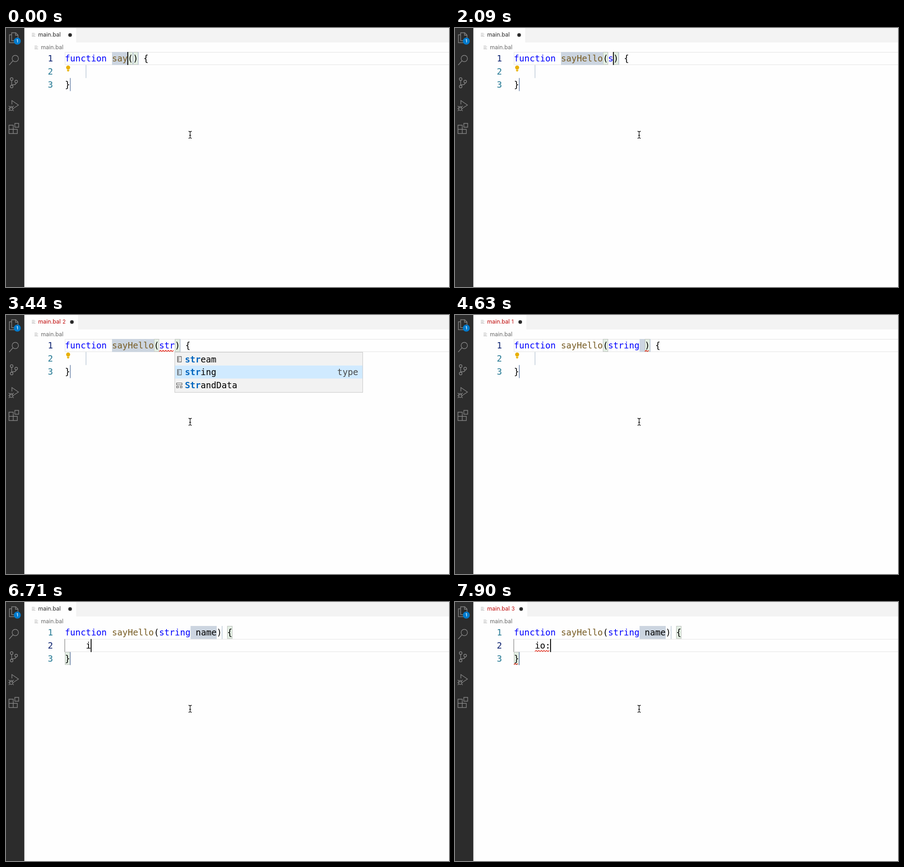
Write an HTML page that moves like this. It is 978 px wide and 573 px high and loops after 8 s.

```html
<!DOCTYPE html>
<html lang="en">
<head>
<meta charset="utf-8">
<title>Editor typing</title>
<style>
  html, body { margin: 0; width: 100%; height: 100%; overflow: hidden; background: #fefefe; }
  svg { display: block; position: absolute; left: 0; top: 0; }
  text { white-space: pre; }
  .code { font: 19.2px "DejaVu Sans Mono", monospace; fill: #000; }
  .ui { font: 12.5px Inter, sans-serif; }
  .kw { fill: #00f; }
  .fn { fill: #795e26; }
  .match { fill: #0066bf; font-weight: bold; }
  .icon { fill: none; stroke: #858585; stroke-width: 1.4; }
  .thin { fill: none; stroke: #505050; stroke-width: 1.1; }
  .lines { stroke: #c3c3c3; stroke-width: 1.1; fill: none; }
  .squiggle { fill: none; stroke: #e51400; stroke-width: 1.2; }
  .bracket { fill: #e4f0e4; stroke: #b9bdb9; }
</style>
</head>
<body>
<svg width="978" height="573" viewBox="0 0 978 573">
  <rect width="978" height="32" fill="#f3f3f3"/>
  <g id="tab"></g>
  <path class="lines" d="M57 11.5h6M57 13.8h8M57 16.1h6M57 18.4h8"/>
  <path class="lines" d="M63 39.5h6M63 41.8h8M63 44.1h6M63 46.4h8"/>
  <text class="ui" x="77" y="47" fill="#6c6c6c">main.bal</text>

  <g id="editor"></g>

  <rect width="40.5" height="573" fill="#2c2c2c"/>
  <g class="icon">
    <path d="M12.5 10.5h9l5 5v12.5h-14zM21 10.5v5.5h5.500M12.500 15h-5v17.500h13v-4"/>
    <circle cx="20.500" cy="67.500" r="7"/>
    <path d="M15.500 72.500L7 82"/>
    <circle cx="12.500" cy="113" r="3"/>
    <circle cx="22.500" cy="118.500" r="3"/>
    <circle cx="12.500" cy="129.500" r="3"/>
    <path d="M12.500 116v10.500M22.500 121.500q-1 4-5 4h-2q-3 0-3 2"/>
    <path d="M13 169V160.500L27.500 170.500L17.500 177"/>
    <ellipse cx="11.500" cy="178" rx="3.500" ry="4.500"/>
    <path d="M8 176.500h7M6 172.500l3 2.500M17 172.500l-3 2.500M5.500 178.500h2.500M15 178.500h2.500M6 183.500l3-2.500M17 183.500l-3-2.500"/>
    <path d="M6.500 215h9.500v18.500h-9.500zM6.500 224.200h18.500v9.300h-9M19.500 211h8.500v8.500h-8.500z"/>
  </g>
  <circle cx="25" cy="29" r="7.700" fill="#007acc"/>
  <text x="25" y="32.300" text-anchor="middle" fill="#fff" style="font:600 9px Inter, sans-serif">1</text>

  <path d="M403 228.500q3.500 0 3.500 2.500v10.500q0 2.500-3.500 2.500M410 228.500q-3.500 0-3.500 2.500M410 244q-3.500 0-3.500-2.500M404.500 237.500h4"
    fill="none" stroke="#111" stroke-width="1.300"/>
</svg>
<script>
const LOOP = 8000, CHAR = 11.56, LEFT = 130, TOP = 53, ROW = 28.85;
const colX = col => LEFT + col * CHAR;
const rowY = row => TOP + row * ROW;

const initial = {
  name: 'say', args: '', body: '', errors: 0, row: 0, caret: 12, caretOn: true,
  bulb: true, mark: [9, 12], wavy: [], popup: null
};
const popup = (col, row, match, items, selected, kind = 'type') =>
  ({ col, row, match, items, selected, kind });
const stTypes = ['stream', 'string', 'StrandData'];
const ioItems = ['io', 'ioError'];

// Each step overrides part of the preceding state.
const steps = [
  [0, {}],
  [300, { name: 'sayH', caret: 13, mark: [9, 13] }],
  [450, { name: 'sayHe', caret: 14 }],
  [600, { mark: [9, 14] }],
  [900, { name: 'sayHell', caret: 16, mark: [9, 16] }],
  [1050, { name: 'sayHello', caret: 17, mark: [9, 17] }],
  [1500, { caret: 18 }],
  [2090, { args: 's', caret: 19 }],
  [2240, { errors: 2, wavy: [[0, 18, 19]], popup: popup(19, 0, 1, [...stTypes, 'service', 'start'], 0) }],
  [2390, { args: 'st', caret: 20, popup: popup(20, 0, 2, stTypes, 0) }],
  [2540, { args: 'str', caret: 21, popup: popup(21, 0, 3, stTypes, 0) }],
  [2690, { wavy: [[0, 18, 21]] }],
  [2990, { caretOn: false }],
  [3440, { popup: popup(21, 0, 3, stTypes, 1) }],
  [3590, { args: 'string', caret: 24, caretOn: true, popup: null, wavy: [[0, 18, 24]] }],
  [3730, { mark: null }],
  [4030, { args: 'string ', caret: 25, mark: [24, 25], wavy: [] }],
  [4180, { errors: 1 }],
  [4330, { wavy: [[0, 25, 26]] }],
  [4630, { caretOn: false }],
  [4780, { args: 'string n', caret: 26, caretOn: true, mark: [24, 26], wavy: [[0, 26, 27]] }],
  [4930, { args: 'string na', caret: 27, mark: [24, 27], wavy: [] }],
  [5080, { args: 'string nam', caret: 28, mark: [24, 28], errors: 0 }],
  [5220, { args: 'string name', caret: 29, mark: [24, 29] }],
  [5670, { caretOn: false }],
  [5970, { row: 1, caret: 4, caretOn: true }],
  [6270, { bulb: false }],
  [6420, { caretOn: false }],
  [6710, { body: 'i', caret: 5, caretOn: true }],
  [6860, { popup: popup(5, 1, 1, ['int', 'if', 'import', 'io', 'is'], 0) }],
  [7010, { body: 'io', caret: 6, errors: 3, wavy: [[1, 4, 5], [2, 0, 1]], popup: popup(6, 1, 2, ioItems, 0, 'module') }],
  [7300, { caretOn: false }],
  [7450, { wavy: [[1, 4, 6], [2, 0, 1]] }],
  [7750, { body: 'io:', caret: 7, caretOn: true }],
  [7900, { popup: null, wavy: [[1, 4, 7], [2, 0, 1]] }]
];
let latest = initial;
const timeline = steps.map(([at, change]) => ({ at, state: latest = { ...latest, ...change } }));

const rect = (x, y, w, h, attrs) => `<rect x="${x}" y="${y}" width="${w}" height="${h}" ${attrs}/>`;
const code = (x, row, content, attrs = '') =>
  `<text class="code" x="${x}" y="${rowY(row) + 21.3}" ${attrs}>${content}</text>`;
const span = (cls, content) => `<tspan class="${cls}">${content}</tspan>`;
const stop = (col, row, color = '#c5d0dd') =>
  rect(colX(col) - .5, rowY(row), 1.7, ROW, `fill="${color}"`);
const bracket = (col, row) =>
  rect(colX(col) + .5, rowY(row) + .5, CHAR - 1, ROW - 1.5, 'class="bracket"');

function squiggle([row, from, to]) {
  const start = colX(from), end = colX(to), y = rowY(row) + 26.5;
  let d = `M${start} ${y + 1.3}`;
  for (let x = start + 2.9, i = 0; x <= end; x += 2.9, i++) d += `L${x} ${y + (i % 2 ? 1.3 : -1.3)}`;
  return `<path class="squiggle" d="${d}"/>`;
}

function drawTab({ errors }) {
  const dot = [141.5, 144, 145.5, 146][errors], ink = errors ? '#bf0808' : '#2b2b2b';
  return rect(40, 0, dot - 26.5, 32, 'fill="#fefefe"') +
    `<text class="ui" x="71" y="19.3" fill="${ink}">main.bal</text>` +
    (errors ? `<text class="ui" x="124.7" y="19.3" fill="${ink}" style="font-size:11.5px">${errors}</text>` : '') +
    `<circle cx="${dot}" cy="15.5" r="4" fill="#2b2b2b"/>`;
}

function drawPopup({ col, row, match, items, selected, kind }) {
  const x = colX(col) - .2, y = rowY(row + 1) + .6, height = items.length * 28.8 + 2.4;
  let out = rect(x, y, 415, height, 'fill="#f2f2f2" stroke="#c6c6c6"');
  items.forEach((item, i) => {
    const line = row + 1 + i, top = y + 1 + i * 28.8, mid = top + 14.4;
    if (i === selected) {
      out += rect(x + .5, top - .5, 414, 28.8, 'fill="#d0eaff"') +
        code(x + 405, line + .05, kind, 'text-anchor="end" style="fill:#494949"');
    }
    const icon = /^[A-Z]/.test(item)
      ? `M${x + 4} ${mid - 5}h12v4h-12zM${x + 4} ${mid + 2}h4v3.500h-4zM${x + 12} ${mid + 2}h4v3.500h-4z`
      : `M${x + 6} ${mid - 6}h8.500v12h-8.500zM${x + 6} ${mid - 3}h4M${x + 6} ${mid}h4M${x + 6} ${mid + 3}h4`;
    out += `<path class="thin" d="${icon}"/>` +
      code(x + 22.5, line + .05, span('match', item.slice(0, match)) + item.slice(match));
  });
  return out;
}

function drawEditor(s) {
  const open = 9 + s.name.length, close = open + 1 + s.args.length;
  let out = `<path d="M978 ${rowY(s.row) + .7}H130.500V${rowY(s.row + 1) - .7}H978" fill="none" stroke="#ebebeb" stroke-width="1.500"/>`;
  if (s.mark) out += rect(colX(s.mark[0]), TOP, (s.mark[1] - s.mark[0]) * CHAR, ROW, 'fill="#ccd5e0"');

  const pairs = s.row ? [[close + 2, 0], [0, 2]] : [[open, 0], [close, 0]];
  out += pairs.map(p => bracket(...p)).join('');
  if (!s.args) out += stop(open + 1, 0);
  out += stop(close + 1, 0) + stop(1, 2, '#7d93b3');
  out += s.row ? rect(129, rowY(1), 1.2, ROW, 'fill="#909090"') : stop(4, 1);

  for (let row = 0; row < 3; row++) {
    out += code(92.3, row, row + 1, `style="fill:${row === s.row ? '#0b216f' : '#237893'}"`);
  }
  const args = s.args.startsWith('s') ? span('kw', s.args.slice(0, 6)) + s.args.slice(6) : s.args;
  out += code(LEFT, 0, `${span('kw', 'function')} ${span('fn', s.name)}(${args}) {`);
  out += code(colX(4), 1, s.body) + code(LEFT, 2, '}');
  out += s.wavy.map(squiggle).join('');

  if (s.bulb) {
    out += '<path fill="#e8b000" d="M137.200 83a4.400 4.400 0 0 1 2.500 8v1.300h-5V91a4.400 4.400 0 0 1 2.500-8zM134.700 93h5v1.500l-1.300 1.500h-2.400l-1.300-1.500z"/>';
  }
  if (s.caretOn) out += rect(colX(s.caret) - .9, rowY(s.row), 1.9, ROW, 'fill="#000"');
  if (s.popup) out += drawPopup(s.popup);
  return out;
}

const tab = document.getElementById('tab'), editor = document.getElementById('editor');
let shown = null;
function frame() {
  const time = performance.now() % LOOP;
  const { state } = timeline.findLast(step => step.at <= time);
  if (state !== shown) {
    tab.innerHTML = drawTab(state);
    editor.innerHTML = drawEditor(state);
    shown = state;
  }
  requestAnimationFrame(frame);
}
frame();
</script>
</body>
</html>
```
